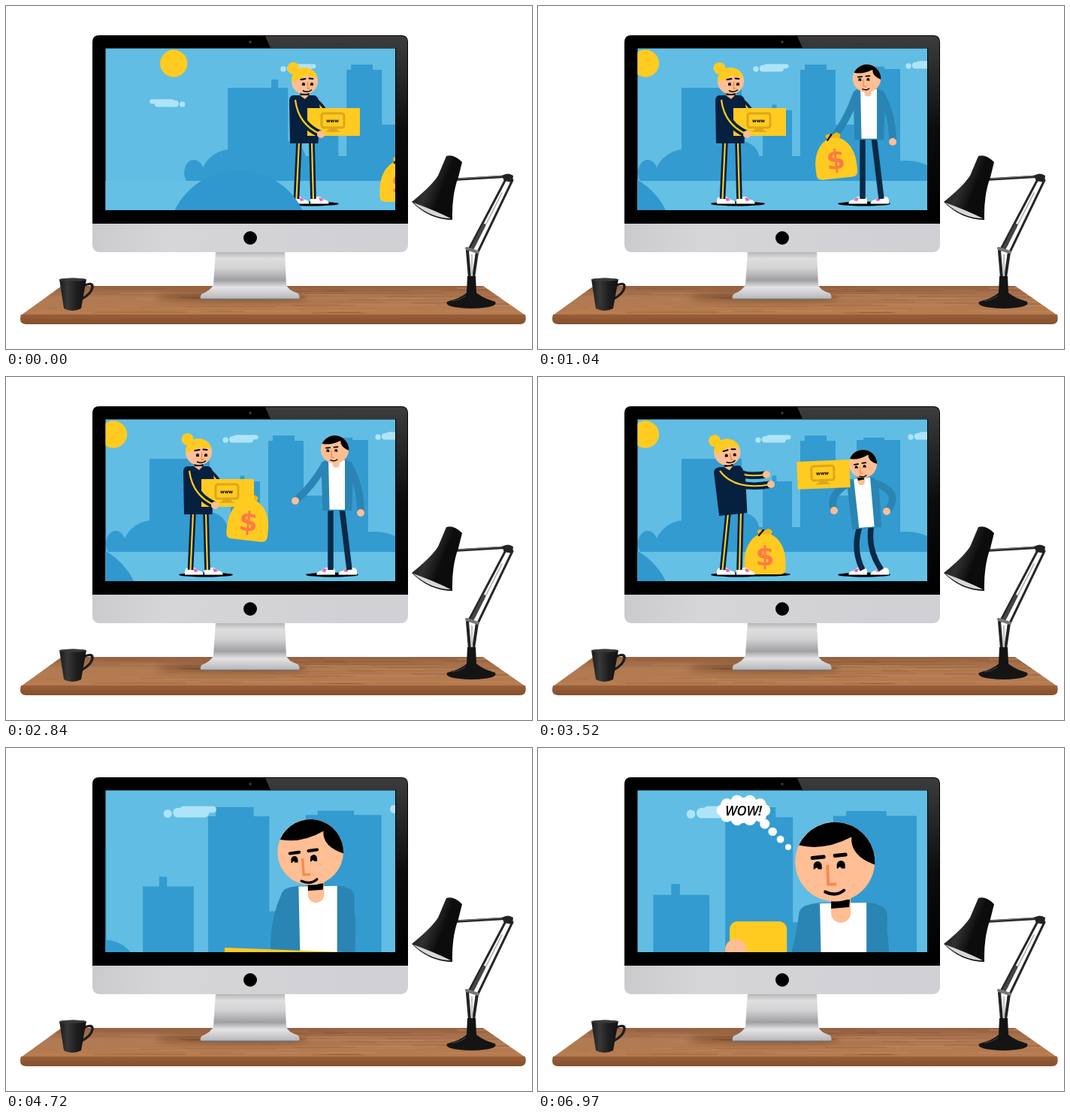
An HTML page that plays this animation: 700x457 px, repeating every 7670 ms.

```html
<!DOCTYPE html>
<html lang="en">
<head>
<meta charset="utf-8">
<title>Desk animation</title>
<style>
html, body { margin: 0; width: 100%; height: 100%; overflow: hidden; background: #fff; }
svg { display: block; width: 100%; height: 100%; }
.www { font: bold 6.2px "DejaVu Sans", sans-serif; text-anchor: middle; }
.cash { font: bold 36px "DejaVu Sans", sans-serif; text-anchor: middle; fill: #ff7a45; }
.wow { font: italic 600 18px "Open Sans", sans-serif; text-anchor: middle; }
</style>
</head>
<body>
<svg viewBox="0 0 700 457" xmlns="http://www.w3.org/2000/svg">
<defs>
  <clipPath id="screen"><rect x="132.5" y="56.5" width="385.5" height="215.5"/></clipPath>
  <clipPath id="top"><path d="M74 373H635L691 412H20Z"/></clipPath>
  <linearGradient id="chin" x1="0" y1="0" x2="1" y2=".12">
    <stop offset="0" stop-color="#c6c6c9"/><stop offset=".35" stop-color="#d6d6d8"/><stop offset="1" stop-color="#d0d0d5"/>
  </linearGradient>
  <linearGradient id="gloss" x1="0" y1="0" x2="0" y2="1">
    <stop offset="0" stop-color="#3c3c3c"/><stop offset=".5" stop-color="#0c0c0c"/><stop offset="1" stop-color="#000"/>
  </linearGradient>
  <linearGradient id="stand" x1="0" y1="0" x2="0" y2="1">
    <stop offset="0" stop-color="#b2b2b5"/><stop offset=".15" stop-color="#dededf"/><stop offset=".35" stop-color="#d2d2d4"/>
    <stop offset=".6" stop-color="#a0a0a4"/><stop offset=".75" stop-color="#e4e4e6"/><stop offset="1" stop-color="#b4b4b8"/>
  </linearGradient>
  <linearGradient id="wood" x1="0" y1="0" x2="0" y2="1">
    <stop offset="0" stop-color="#94603f"/><stop offset=".4" stop-color="#b07a53"/><stop offset="1" stop-color="#b67a4e"/>
  </linearGradient>
  <linearGradient id="edge" x1="0" y1="0" x2="0" y2="1">
    <stop offset="0" stop-color="#9a5f39"/><stop offset="1" stop-color="#83502d"/>
  </linearGradient>
  <linearGradient id="mug" x1="0" y1="0" x2="1" y2="0">
    <stop offset="0" stop-color="#1a1a1a"/><stop offset=".3" stop-color="#383838"/><stop offset=".65" stop-color="#1d1d1d"/><stop offset="1" stop-color="#111"/>
  </linearGradient>
  <linearGradient id="shade" x1="0" y1="0" x2="1" y2=".5">
    <stop offset="0" stop-color="#111"/><stop offset=".45" stop-color="#303030"/><stop offset=".7" stop-color="#0c0c0c"/>
  </linearGradient>
  <filter id="soft" x="-20%" y="-200%" width="140%" height="500%"><feGaussianBlur stdDeviation="4"/></filter>
</defs>

<!-- desk -->
<path d="M74 373H635L691 412H20Z" fill="url(#wood)"/>
<g id="grain" clip-path="url(#top)"></g>
<g clip-path="url(#top)"><ellipse cx="300" cy="388" rx="100" ry="5" fill="#4a2810" opacity=".5" filter="url(#soft)"/></g>
<path d="M20 411H691Q694 424 684 424H27Q16 424 20 411Z" fill="url(#edge)"/>

<!-- monitor -->
<path d="M279 327H371L373 371Q374 378 389 383Q393 391 387 391H263Q256 391 260 384Q274 378 276 371Z" fill="url(#stand)"/>
<path d="M260 390.5H390" stroke="#737377" stroke-width="1.4"/>
<rect x="115" y="39" width="420" height="289" rx="9" fill="url(#chin)"/>
<path d="M115 290V48Q115 39 124 39H526Q535 39 535 48V290Z" fill="#000"/>
<path d="M345 40H526Q534 40 534 48V289H519V56H352Z" fill="url(#gloss)"/>
<circle cx="325" cy="48" r="1.7" fill="#34405a"/>
<circle cx="325" cy="309" r="9" fill="#000"/>
<g id="scene" clip-path="url(#screen)"></g>

<!-- mug -->
<path d="M103 373Q116 367 115 375Q113 384 101 390" fill="none" stroke="#1c1c1c" stroke-width="3.4"/>
<path d="M71 364Q89 361 107 364L100 403Q88 409 77 403Z" fill="url(#mug)"/>
<ellipse cx="89" cy="364.5" rx="17.5" ry="2" fill="#3a3a3a"/>

<!-- lamp -->
<g fill="none" stroke-linecap="round">
  <path d="M600 231L668 227" stroke="#2a2a2a" stroke-width="3.4"/>
  <path d="M602 230L664 226" stroke="#888" stroke-width=".8"/>
  <path d="M665 231L615 326M674 232L626 332" stroke="#262626" stroke-width="3"/>
  <path d="M660 249L624 320" stroke="#b0b0b0" stroke-width="1.6"/>
  <path d="M636 292L621 322" stroke="#444" stroke-width="4.5"/>
  <path d="M614 326L617 362M627 328L622 362" stroke="#222" stroke-width="4"/>
  <path d="M620 332V360" stroke="#c4c4c4" stroke-width="2.4"/>
  <path d="M613 323L628 328" stroke="#777" stroke-width="4"/>
</g>
<path d="M660 226Q668 221 675 226L674 235L663 233Z" fill="#222"/>
<path d="M614 360H625L626 382Q634 389 651 394Q656 402 620 403Q582 402 587 394Q606 389 613 382Z" fill="#141414"/>
<path d="M594 393Q604 392 612 386" fill="none" stroke="#484848"/>
<path d="M586 200Q596 197 607 208L602 228Q593 252 594 285Q562 284 540 261Q566 240 575 226Z" fill="url(#shade)"/>
<path d="M542 262Q566 283 592 283Q570 272 542 262Z" fill="#d8d8d4"/>
</svg>

<script>
const LOOP = 7670, STEP = 40, LAST = 6970;
const BLUE = '#339bd0', SKY = '#61bde3', YELLOW = '#ffcb21', NAVY = '#06203f',
      SKIN = '#ffbe93', NOSE = '#f58a4e', JACKET = '#2a85b4', TROUSER = '#0a2a47', CLOUD = '#aee4f8';
const FX = 458, FY = 77, U = 1 / 2.83;

const clamp = v => Math.max(0, Math.min(1, v));
const ease = v => (1 - Math.cos(Math.PI * clamp(v))) / 2;
const mix = (a, b, u) => a + (b - a) * u;
const span = (t, a, b) => clamp((t - a) / (b - a));
const beat = (t, a, b) => ease(span(t, a, b));

const g = (tr, s) => `<g transform="${tr}">${s}</g>`;
const rect = (x, y, w, h, f, r = 0) => `<rect x="${x}" y="${y}" width="${w}" height="${h}" rx="${r}" fill="${f}"/>`;
const oval = (x, y, rx, ry, f) => `<ellipse cx="${x}" cy="${y}" rx="${rx}" ry="${ry}" fill="${f}"/>`;
const dot = (x, y, r, f) => oval(x, y, r, r, f);
const fill = (d, f) => `<path d="${d}" fill="${f}"/>`;
const line = (d, c, w, cap = 'round') => `<path d="${d}" fill="none" stroke="${c}" stroke-width="${w}" stroke-linecap="${cap}"/>`;

// Perspective layer: nearer layers (larger depth) pan and zoom more
function layer(depth, pan, dolly, s) {
  const z = 1 / (1 - depth * dolly);
  return g(`translate(${FX} ${FY}) scale(${z}) translate(${218 * depth * pan - FX} ${-FY})`, s);
}

const cloud = (x, y, dir = 1) => g(`translate(${x} ${y}) scale(${dir} 1)`,
  dot(0, 0, 3.7, CLOUD) + rect(4.7, -5.2, 32.5, 8.6, CLOUD, 4.3) + rect(11, -6.7, 32.5, 6, CLOUD, 3));

const city =
  fill('M191 233V109H249V98H258V109H271V233Z', BLUE) +
  fill('M299 233V139H311.5V131.4H317.5V139H338V233Z', BLUE) +
  fill('M349 233V85H355V78H384V85H396V158H424V84H433V80.7H461V84H482V233Z', BLUE) +
  oval(146, 222, 13, 17, BLUE) + oval(195, 233, 41, 42, BLUE) + dot(270, 205, 25, BLUE) +
  oval(490, 233, 44, 27, BLUE) + rect(240, 200, 240, 34, BLUE) +
  rect(-200, 233, 1000, 300, '#65c0e5');

const shoe = (x, y, dir) => g(`translate(${x} ${y}) scale(${dir} 1)`,
  fill('M-8 6Q-9 -3 -3 -3L5 -3Q8 1 14 2Q18 5 16 6.5H-8Z', '#fff') + fill('M3 -2L7 -1L10 2L5 3Z', '#f05cc0'));

function arm(x, y, cx, cy, hx, hy, color, stripe) {
  const d = `M${x} ${y}Q${cx} ${cy} ${hx} ${hy}`;
  return dot(x, y, 4.8, color) + line(d, color, 9.6, 'butt') + (stripe ? line(d, YELLOW, 2.2, 'butt') : '') + dot(hx, hy, 5, SKIN);
}

const box = (x, y, rot) => g(`translate(${x} ${y}) rotate(${rot}) translate(-35 -18.5)`,
  rect(0, 0, 70, 37, YELLOW) +
  `<rect x="19" y="7" width="30" height="19" rx="3" fill="none" stroke="#dca71a" stroke-width="3"/>` +
  fill('M29 26H39L41 31H27Z', '#dca71a') + line('M25 31H43', '#dca71a', 1.5) +
  '<text class="www" x="33.5" y="19">www</text>');

const bag = (x, y, rot) => g(`translate(${x} ${y}) rotate(${rot})`,
  fill('M-5 3Q-14 -4 -7 -6Q0 -3 4 -7Q14 -5 6 3Z', '#f3b812') +
  fill('M-6 0C-18 4 -27.5 18 -27.5 38V46Q-27.5 54 -20 54H20Q27.5 54 27.5 46V38C27.5 18 18 4 6 0Z', YELLOW) +
  line('M-8 2L-2 -5', '#1d1a10', 2.4) + '<text class="cash" x="0" y="41.5">$</text>');

// Man: each beat of the story moves him from one pose to the next
function manPose(t) {
  const lift = beat(t, 350, 900), bend = beat(t, 1350, 2000), toss = beat(t, 2360, 2540), wait = beat(t, 2850, 3300),
        grab = beat(t, 3520, 4000), use = beat(t, 4850, 5250), wow = beat(t, 6120, 6480);
  const low = 1 - lift + bend - toss + 1.4 * wait - .72 * grab;
  return {
    low,
    x: 439 - 9 * wait + 8.6 * grab,
    y: 111 + 17 * low,
    rot: -5 * (wait - grab),
    head: {
      x: -1.5 + 4 * wait - 5.7 * grab - 1.4 * use + 1.8 * wow,
      y: -14.5 - 4.7 * wait,
      tilt: -4 * wait + 2 * grab - 4.5 * use + 6.5 * wow,
      fx: -3 + 3 * wow,
      fy: 6 * wait + 4 * use - 10 * wow
    },
    left: {
      x: 384 + 9 * lift + 4 * bend - 12 * toss + 9 * wait + 26 * grab - 30 * use,
      y: 207 - 31 * lift + 6 * bend - 17 * toss + 13 * wait - 2 * grab - 29 * use,
      ox: 3 - 22 * wait + 11 * grab + 18 * use,
      oy: 5 - 8 * wait + 48 * use
    },
    right: {
      x: 472 - 8 * wait - 36 * grab,
      y: 181 - 2 * wait,
      ox: 8 + 16 * low - 4 * grab,
      oy: -6 + 18 * grab
    },
    bagTilt: -6 * lift + 10 * bend + 18 * toss
  };
}

const eye = (x, y) => fill(`M${x - 5.5} ${y + 6}v-5a5.5 5.5 0 0 1 11 0v5Z`, '#000') + dot(x - 1.5, y + 6, 2, SKIN);

const manHead = (fx, fy) =>
  dot(0, 0, 53, SKIN) +
  fill('M-48 -22A53 53 0 0 1 53 4Q20 -8 22 -33Q-14 -14 -48 -22Z', '#000') +
  g(`translate(${fx} ${fy})`,
    line('M-30 -5L-15 -6.5M0 -8L14 -9.5', '#000', 5) + eye(-23, 4) + eye(8, 3) +
    line('M-10 4L-9 30H2', NOSE, 4, 'butt') + line('M-13 40Q2 47 12 38', '#000', 4));

const torso =
  fill('M-28 0L-40 2Q-54 6 -55 24L-50 190H60L64 66Q62 22 50 4Q47 0 34 0Z', JACKET) +
  fill('M-28 1L34 0V186H-24Z', '#fff') +
  fill('M-13 -8V14a13 13 0 0 0 26 0V-8Z', SKIN) + fill('M-13 -4H12L11 6L-13 8Z', '#000');

function man(p) {
  const a = p.rot * Math.PI / 180, hipX = p.x - 66 * Math.sin(a), hipY = p.y + 66 * Math.cos(a), bow = 9 * p.low;
  const leg = (x, foot) => line(`M${x} ${hipY - 3}Q${(x + foot) / 2 - bow} ${(hipY + 257) / 2} ${foot} 257`, TROUSER, 7.5, 'butt');
  const limb = (h, sx) => {
    const x = p.x + sx, y = p.y + 6;
    return arm(x, y, (x + h.x) / 2 + h.ox, (y + h.y) / 2 + h.oy, h.x, h.y, JACKET);
  };
  return shoe(430, 257, -1) + shoe(459, 257, -1) + leg(hipX - 7, 432) + leg(hipX + 8, 457) +
    limb(p.right, 17) + g(`translate(${p.x} ${p.y}) rotate(${p.rot}) scale(${U})`, torso) + limb(p.left, -15) +
    g(`translate(${p.x + p.head.x} ${p.y + p.head.y}) rotate(${p.head.tilt}) scale(${U})`, manHead(p.head.fx, p.head.fy));
}

// Woman
const womanTop = g('translate(256 119)',
  fill('M-14 0H13Q18 0 20 10L21 20L18.5 64H-19L-20 8Q-20 0 -14 0Z', NAVY) +
  fill('M-6 -4H6V0L1 5L-6 0Z', SKIN)) +
  g('translate(256.5 100)',
    dot(-15, -17, 8, YELLOW) + dot(0, 0, 17.6, SKIN) +
    fill('M-17.6 0A17.6 17.6 0 0 1 17 -5Q9 -4 3 -8Q-7 0 -17.6 0Z', YELLOW) +
    line('M-5 -2L1 -3M6 -3.5L11 -3', '#000', 2) +
    fill('M-3.5 6v-2a2 2 0 0 1 4 0v2ZM7.5 6v-2a2 2 0 0 1 4 0v2Z', '#000') +
    line('M4 1V10H7', NOSE, 1.6, 'butt') + line('M-2 13Q4 16 9 12', '#000', 1.5) +
    fill('M-6 16Q0 18 6 16V19H-6Z', '#000'));

function woman(reach) {
  const hip = 4 * reach;
  const leg = (x, foot) => {
    const d = `M${x + hip} 181L${foot} 257`;
    return line(d, NAVY, 7.6, 'butt') + line(d, YELLOW, 2.2, 'butt');
  };
  return shoe(246, 257, 1) + shoe(272, 257, 1) + leg(249, 245.5) + leg(266, 268) +
    arm(267 - 2 * reach, 125, mix(284, 272, reach), mix(136, 134, reach), mix(292, 304, reach), mix(165, 130, reach), NAVY, true) +
    g(`translate(${hip} 0) rotate(${-6 * reach} 256 183)`, womanTop);
}

const nearArm = reach => arm(244 - 2 * reach, 125, mix(248, 262, reach), mix(158, 152, reach),
  mix(278, 310, reach), mix(171, 143, reach), NAVY, true);

function bagAt(t, p) {
  const u = span(t, 2540, 2960);
  return bag(mix(p.left.x, 302, u), mix(p.left.y, 209, u) - 160 * u * (1 - u), p.bagTilt * (1 - u));
}

function boxAt(t) {
  const push = beat(t, 3200, 3340), fly = span(t, 3340, 3640), hold = beat(t, 3640, 3900);
  return box(295 + 25 * push + 100 * fly + hold, 154.5 - 9 * push + 14 * fly - 100 * fly * (1 - fly) + 18 * hold, -4 * fly + 6.2 * hold);
}

function tablet(t) {
  const y = mix(154, 131.4, beat(t, 4950, 5350));
  return rect(386.3, y, 26.9, 42, YELLOW, 3.8) + rect(384.2, y + 8.5, 10, 16, SKIN, 4.6);
}

function bubble(t) {
  const pop = (x, y, start, s) => {
    const k = beat(t, start, start + 120);
    return k ? g(`translate(${x} ${y}) scale(${k})`, s) : '';
  };
  let out = '', puff = oval(0, 0, 30, 17, '#fff');
  for (let i = 0; i < 4; i++) out += pop(333 - 10.4 * i, 132 - 10.3 * i, 6420 + 45 * i, dot(0, 0, 4 + .85 * i, '#fff'));
  for (let i = 0; i < 10; i++) {
    const a = i * Math.PI / 5;
    puff += dot(27.5 * Math.cos(a), 12.5 * Math.sin(a), 8.3, '#fff');
  }
  return out + pop(273.5, 83, 6600, puff + '<text class="wow" x="0" y="6.5">WOW!</text>');
}

function draw(t) {
  const pan = 1 - ease(t / 1040), dolly = beat(t, 3900, 4950), drift = (t - 1040) * .0012;
  const reach = beat(t, 3200, 3380) - beat(t, 3640, 4000), pose = manPose(t);
  const place = (depth, s) => layer(depth, pan, dolly, s);
  const actors = oval(266, 263.5, 36, 3, '#000') + oval(434, 263.5, 35, 3, '#000') +
    (t > 2900 ? oval(305, 263, 31, 2.6, '#000') : '') +
    man(pose) + bagAt(t, pose) + woman(reach) + (t < 4950 ? boxAt(t) : '') + nearArm(reach) + (t > 4950 ? tablet(t) : '');
  return rect(132, 56, 387, 217, SKY) +
    place(.368, dot(143, 76.5, 18.2, YELLOW)) + place(.478, city) +
    place(.368, cloud(290 + drift, 84) + cloud(493 + drift, 80)) + place(.55, cloud(116 + drift, 131, -1)) +
    place(.6466, actors) +
    (dolly < .5 ? place(1.03, dot(85, 313.7, 94.7, '#3097cf')) : '') + bubble(t);
}

// Wood grain
let seed = 7, grain = '';
const rnd = () => (seed = seed * 16807 % 2147483647) / 2147483647;
for (let i = 0; i < 60; i++) {
  const x = 20 + 640 * rnd(), y = 374 + 37 * rnd(), w = 40 + 160 * rnd();
  grain += `<path d="M${x} ${y}q${w / 2} ${rnd() * 2 - 1} ${w} 0" fill="none" stroke="${rnd() < .6 ? '#7e4826' : '#cc966c'}" stroke-width="${.5 + rnd()}" opacity=".3"/>`;
}
document.getElementById('grain').innerHTML = grain;

const scene = document.getElementById('scene'), start = performance.now();
let shown = -1;
function frame(now) {
  const t = Math.max(0, now - start) % LOOP;
  const tick = t >= LAST ? LAST : Math.floor(t / STEP) * STEP;
  if (tick !== shown) scene.innerHTML = draw(shown = tick);
  requestAnimationFrame(frame);
}
frame(start);
</script>
</body>
</html>
```
